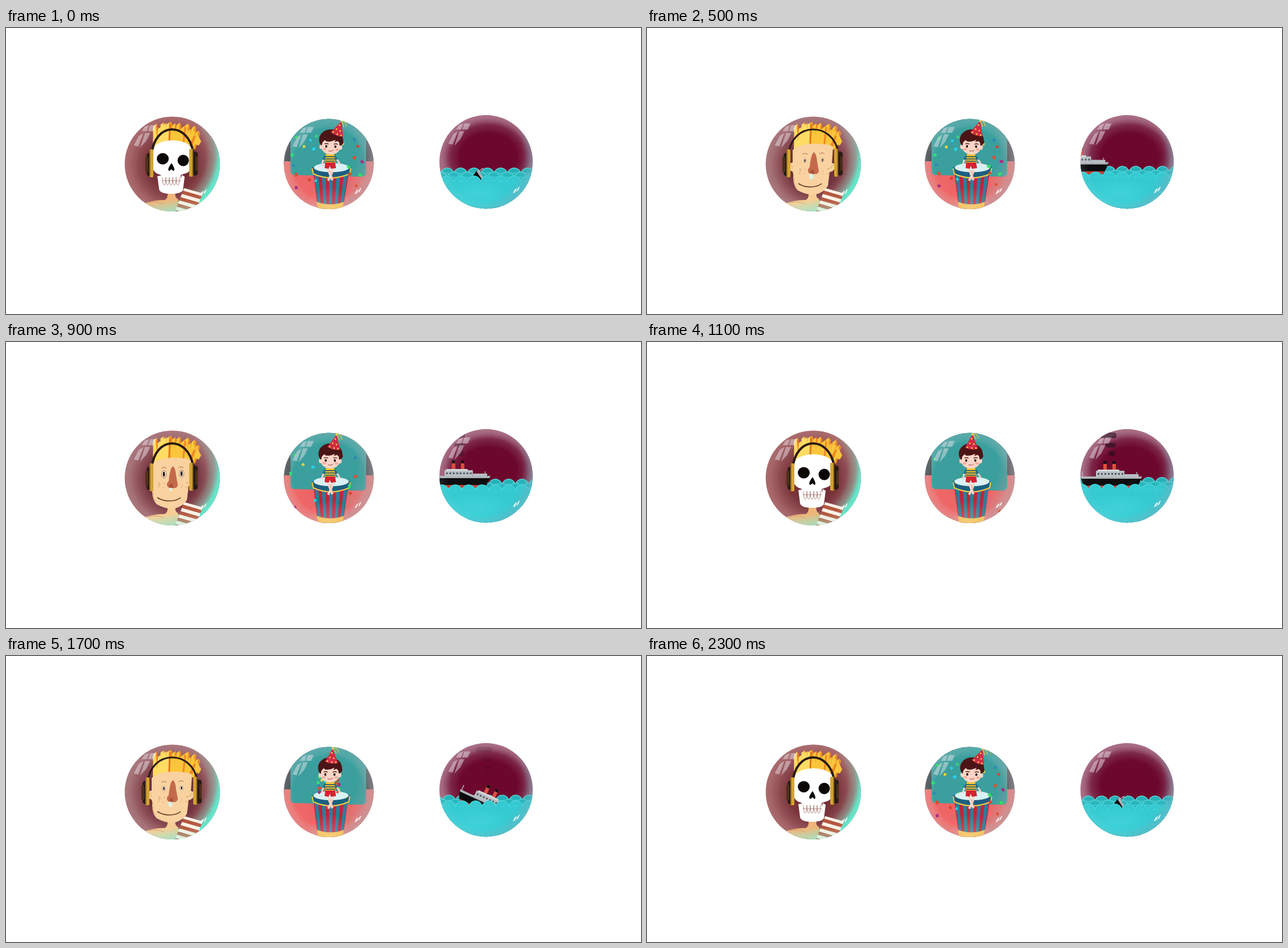
These frames come from a looping animation (1116 px wide and 502 px high, 2.4 s). An HTML page with a canvas:

```html
<!DOCTYPE html>
<html lang="en">
<head>
<meta charset="utf-8">
<title>Three bubbles</title>
<style>
html, body { margin: 0; width: 100%; height: 100%; overflow: hidden; background: #fff; }
canvas { display: block; }
</style>
</head>
<body>
<canvas id="stage" width="1116" height="502"></canvas>
<script>
const ctx = document.getElementById('stage').getContext('2d');
const TAU = Math.PI * 2;
const rad = deg => deg * Math.PI / 180;
const noise = n => { const v = Math.sin(n * 91.7) * 4373.3; return v - Math.floor(v); };

// Linear interpolation through [time, value] stops.
function track(t, ...stops) {
  if (t <= stops[0][0]) return stops[0][1];
  for (let i = 1; i < stops.length; i++) {
    const [t0, a] = stops[i - 1], [t1, b] = stops[i];
    if (t <= t1) return a + (b - a) * (t - t0) / (t1 - t0);
  }
  return stops.at(-1)[1];
}

function fill(color, d) { ctx.fillStyle = color; ctx.fill(new Path2D(d)); }
function line(color, width, d) {
  ctx.strokeStyle = color;
  ctx.lineWidth = width;
  ctx.stroke(new Path2D(d));
}
function oval(color, x, y, rx, ry = rx) {
  ctx.fillStyle = color;
  ctx.beginPath();
  ctx.ellipse(x, y, rx, ry, 0, 0, TAU);
  ctx.fill();
}
function box(color, x, y, w, h) { ctx.fillStyle = color; ctx.fillRect(x, y, w, h); }
function pill(color, x, y, w, h, r) {
  ctx.fillStyle = color;
  ctx.beginPath();
  ctx.roundRect(x, y, w, h, r);
  ctx.fill();
}
function placed(x, y, turn, draw) {
  ctx.save();
  ctx.translate(x, y);
  ctx.rotate(turn);
  draw();
  ctx.restore();
}
// Elliptical wash over a bubble; stops are [offset, color].
function wash(x, y, rx, ry, ...stops) {
  ctx.save();
  ctx.translate(x, y);
  ctx.scale(rx / 100, ry / 100);
  const g = ctx.createRadialGradient(0, 0, 0, 0, 0, 100);
  stops.forEach(([at, color]) => g.addColorStop(at, color));
  box(g, -500, -500, 1000, 1000);
  ctx.restore();
}

function bubble(x, y, rx, ry, scene) {
  ctx.save();
  ctx.beginPath();
  ctx.ellipse(x, y, rx, ry, 0, 0, TAU);
  ctx.clip();
  scene();
  ctx.translate(x, y);
  ctx.scale(rx / 84, ry / 84);
  const pane = 'rgba(235,225,232,.48)';
  fill(pane, 'M-54-58L-49-66L-41-69L-45-58ZM-43-58L-39-69L-28-69L-33-58Z');
  fill(pane, 'M-68-33L-59-50L-51-55L-60-31ZM-57-29L-48-55L-39-55L-46-41Z');
  fill('rgba(255,255,255,.85)', 'M48 56L52 49L56 47L52 55ZM54 54L58 46L61 44L58 51Z');
  ctx.restore();
}

/* ---- listener ---- */

function hair() {
  for (let i = 0; i < 20; i++) {
    const u = (i * 7 % 20) / 19;
    const x = 262 + u * 66, top = 166 + noise(i) * 11 + 20 * (u - .45) ** 2;
    const tip = x + (u - .15) * 9 + noise(i + 40) * 6 - 3;
    fill(i % 3 ? '#fbc63b' : '#ffdc63', `M${x - 4} 213L${tip - 4} ${top + 2}L${tip + 2} ${top - 2}L${x + 4} 213Z`);
    fill(i % 2 ? '#ee8a22' : '#e07a1c', `M${x + 2} 213L${tip + 1} ${top - 2}L${tip + 4} ${top + 2}L${x + 5} 213Z`);
  }
  fill('#fbc63b', 'M322 208L337 187L343 199L339 206L330 204L325 212Z');
  fill('#ee8a22', 'M320 210L330 189L334 189L326 211Z');
}

function skull() {
  fill('#fff', 'M257 218Q258 199 292 197Q321 198 327 213L327 240Q326 253 313 256L307 258L307 270L274 270L272 258Q257 254 257 240Z');
  fill('#fff', 'M266 260L272 259L275 268L306 268L309 258L314 261L311 284Q309 291 290 291Q271 291 269 283Z');
  oval('#0b0705', 275.5, 229.5, 10.5, 10);
  oval('#0b0705', 311.5, 232.5, 10, 10);
  fill('#0b0705', 'M291 237Q282 249 287 251L291 248L294 251Q299 250 291 237Z');
  let teeth = 'M274 268L307 268M275 262';
  for (let x = 275; x < 303; x += 6) teeth += `Q${x} 275 ${x + 3} 276Q${x + 6} 274 ${x + 6} 262`;
  line('#a06b63', .8, teeth);
}

function face(t) {
  const drip = track(t, [100, 0], [300, 1], [400, 1], [700, 0], [1500, 0], [1900, 1], [2200, .6]);
  const eye = 1 - drip * .62;
  fill('#f9d2a0', 'M256 214Q270 203 292 203Q318 203 327 208L325 237Q331 237 330 244Q329 252 321 253L318 277Q312 288 297 292Q281 294 265 285Q257 277 257 263Q258 258 256 252Q249 251 250 243Q251 236 256 236Z');
  line('#d99d6d', 1, 'M252 241Q256 241 255 247M323 247Q325 240 328 241M259 264Q256 273 263 279');
  line('#a8653e', 1, 'M273 222Q278 218 282 222M303 221Q308 217 312 221');
  for (const [x, y] of [[277.5, 232], [308.5, 231]]) {
    oval('#8a5337', x, y + drip, 4.4 * eye, 6.7 * eye);
    oval('#fff0e0', x, y + drip, 3.8 * eye, 6.1 * eye);
    oval('#20110c', x, y + drip, 1.9 * eye, 4.2 * eye);
  }
  for (let i = 0; i < 16; i++) {
    const side = i % 2 ? 308 : 266;
    oval('#d38d58', side + noise(i + 3) * 13, 246 + noise(i + 11) * 11, .8);
  }
  fill('#c5694b', 'M293 218Q298 220 299 235L302 251Q300 258 294 256Q289 258 284 254Q281 249 286 244Q288 222 293 218Z');
  fill('#a94f39', 'M288 250Q293 246 294 256Q290 258 286 255Z');
  oval('#d9f3e8', 289.5 - drip, 259 + drip * 2.5, 2.5 + drip * 2, 3.3 + drip * 3);
  line('#653020', 1.6, 'M266 273Q275 279 287 279Q300 279 307 273');
  if (t >= 600 && t <= 800)
    for (let i = 0; i < 10; i++)
      oval('#fff8e9', (i % 2 ? 320 : 265) + noise(i) * 4, 218 + i * 3.6, 1.3, 1.8);
}

function headphones(open) {
  const left = 256 - open * 14, right = 329 + open * 14;
  line('#2a1a13', 4 - open * 1.8, `M${left} 222C${left + 5} 164 ${right - 9} 164 ${right} 218`);
  pill('#2a1c14', left - 9, 219, 10, 41, 5);
  pill('#4c3019', left - 11, 226, 5, 27, 3);
  pill('#d5a431', left - 4, 213, 7, 49, 2);
  pill('#9b7222', left - 4, 213, 2, 49, 1);
  pill('#2a1c14', right - 1, 217, 9, 42, 5);
  pill('#4c3019', right + 4, 225, 4, 26, 3);
  pill('#d5a431', right - 7, 212, 7, 49, 2);
  pill('#9b7222', right - 2, 212, 2, 49, 1);
}

function listener(t) {
  const bones = t % 1200 >= 1000;
  box(bones ? '#a05d60' : '#9f6a70', 200, 150, 190, 180);
  wash(292, 240, 74, 76, [0, '#672031'], [.6, bones ? '#7a363b' : '#733440'], [.8, 'rgba(128,62,70,.6)'], [1, 'rgba(150,85,92,0)']);
  fill(bones ? '#efb578' : '#f7cd94', 'M236 310Q262 301 279 302Q285 299 284 288L298 286Q296 298 302 300L310 326L232 326Z');
  line('#d79b67', 1, 'M250 307Q266 303 278 309');
  wash(266, 222, 112, 112, [0, 'rgba(120,230,205,0)'], [.76, 'rgba(120,225,200,0)'], [.89, 'rgba(120,205,180,.4)'], [.97, 'rgba(85,232,200,.92)'], [1, '#54e6c8']);
  placed(313, 281, rad(16), () => {
    ctx.beginPath();
    ctx.moveTo(0, 0); ctx.lineTo(34, 0); ctx.lineTo(30, 44); ctx.lineTo(-4, 44);
    ctx.clip();
    for (let i = 0; i < 8; i++) box(i % 2 ? '#b6583e' : '#fff1e6', -8, i * 6 - 1, 50, 6);
  });
  wash(296, 334, 70, 34, [0, 'rgba(150,245,215,.7)'], [1, 'rgba(150,245,215,0)']);
  hair();
  bones ? skull() : face(t);
  headphones(track(t % 1200, [200, 0], [300, 1], [400, 1], [600, 0]));
  wash(292, 239, 85, 85, [0, 'rgba(255,235,235,0)'], [.8, 'rgba(255,235,235,0)'], [1, 'rgba(255,235,235,.12)']);
}

/* ---- party boy ---- */

const confettiSpots = [
  [510, 192], [503, 223], [524, 208], [541, 212], [505, 241], [510, 257], [533, 266],
  [544, 268], [612, 196], [612, 228], [618, 208], [626, 235], [623, 258], [616, 277],
  [604, 256], [510, 280], [602, 244], [545, 190], [592, 203], [535, 197]
];
const confettiColors = ['#e34c2d', '#35df62', '#28d1ed', '#d5462e', '#32de7c', '#2b86b8', '#a82f82', '#f2d23a'];

function confetti(t) {
  const phase = t % 1600;
  if (phase < 100 || phase > 1100) return;
  const spread = track(phase, [100, .3], [200, .62], [300, .84], [500, .95], [700, 1], [1100, 1.08]);
  const drop = track(phase, [700, 0], [1100, 16]);
  const count = track(phase, [700, 20], [900, 11], [1100, 2]);
  for (let i = 0; i < count; i++) {
    const [x, y] = confettiSpots[(i * 7 + 13) % 20];
    placed(568 + (x - 568) * spread, 222 + (y - 222) * spread + drop, i * 1.9 + phase / 260, () => {
      const w = 3 + noise(i) * 3;
      fill(confettiColors[i % 8], `M${-w / 2}-2L${w / 2}-3L${w / 2 + 1} 2L${-w / 2} 2.5Z`);
    });
  }
}

function drum(lean) {
  ctx.save();
  ctx.beginPath();
  ctx.moveTo(540, 252); ctx.lineTo(601 + lean, 252);
  ctx.lineTo(592, 318); ctx.lineTo(548, 318);
  ctx.clip();
  box('#c52235', 530, 245, 82, 75);
  for (let i = 0; i < 5; i++) {
    const a = 541 + i * 13.4, b = 549 + i * 9.4;
    fill('#2b7d9b', `M${a} 248L${a + 7} 248L${b + 5} 318L${b} 318Z`);
  }
  ctx.restore();
  fill('#f2c255', 'M546 305Q570 314 594 305L592 316Q570 325 548 316Z');
  fill('#1d5f80', `M537 245Q571 232 ${605 + lean} 245L${602 + lean} 257Q571 269 539 257Z`);
  line('#f5cf42', 2, `M538 246L540 256Q571 270 ${602 + lean} 256L${604 + lean} 246`);
  oval('#d9f1f4', 571 + lean / 2, 245, 31, 8);
}

function hat(tilt) {
  placed(570 + tilt * 11, 187, rad(2 + tilt * 16), () => {
    line('#e9c63b', 1.3, 'M0-24Q8-29 12-18M0-24Q5-23 8-16');
    fill('#d22b45', 'M-11-1L1-25L12 0Q0 4-11-1Z');
    for (const [x, y] of [[0, -17], [-3, -9], [4, -8], [-7, -2], [1, -1], [8, -1]]) oval('#ffd64c', x, y, 1.4);
    oval('#ffd64c', 1, -25, 1.8);
  });
}

function boy(tilt) {
  const skin = '#fbd5c7';
  line(skin, 4, 'M565 243Q568 255 574 267M575 243Q574 255 566 268');
  line('#d69a8d', .7, 'M570 250L575 266');
  fill('#d42331', 'M561 234L578 234L580 246L571 247L569 242L567 247L560 246Z');
  line(skin, 3, 'M560 229Q555 234 556 241M580 229Q585 234 587 240');
  fill('#1f6e8b', 'M562 221L556 230L561 233L566 225ZM577 221L583 230L578 233L573 225Z');
  fill('#f1c332', 'M562 221L577 221L579 236L560 236Z');
  for (const y of [225, 229, 233]) box('#174f66', 561, y, 17, 1.6);
  placed(569 + tilt * 2, 205, rad(tilt * 2), () => {
    oval(skin, -17, 4, 3, 4);
    oval(skin, 17, 4, 3, 4);
    oval('#4b1517', 0, -9, 21, 18);
    oval(skin, 0, 3, 17, 14);
    fill('#4b1517', 'M-20-12Q-13-27 0-27Q20-24 22-4Q18 2 15 0L15-8L6-5L8-9Q-2-4-9-6L-11-9L-15-4L-16 2Q-22-2-20-12Z');
    line('#5b2017', 1.4, 'M-11-1Q-8-3-4-1M5-1Q9-3 12-1');
    oval('#180d0c', -8, 3, 1.8, 2.3);
    oval('#180d0c', 8, 3, 1.8, 2.3);
    oval('rgba(240,132,120,.55)', -11, 8, 3, 2);
    oval('rgba(240,132,120,.55)', 11, 8, 3, 2);
    line('#a5493d', 1, 'M-4 10Q0 13 5 9');
  });
  hat(tilt);
}

function party(t) {
  const tilt = track(t, [100, .2], [300, .5], [700, 1], [1100, 0], [1400, .35], [1900, 0], [2300, 1]);
  box('#41474b', 480, 150, 180, 90);
  box('#ed716f', 480, 234, 180, 90);
  wash(560, 260, 66, 66, [0, 'rgba(242,58,66,.3)'], [.7, 'rgba(242,58,66,.18)'], [1, 'rgba(242,58,66,0)']);
  fill('#3a9f9d', 'M480 150L655 150L633 195L633 255Q632 261 624 261L506 258Q500 257 500 251L500 195Z');
  wash(567, 239, 80, 80, [0, 'rgba(255,255,255,0)'], [.78, 'rgba(255,255,255,0)'], [.88, 'rgba(210,220,224,.14)'], [1, 'rgba(195,205,212,.25)']);
  wash(530, 216, 126, 126, [0, 'rgba(175,160,165,0)'], [.68, 'rgba(175,160,165,0)'], [1, 'rgba(175,160,165,.55)']);
  drum(tilt * 2);
  confetti(t);
  boy(tilt);
  wash(567, 320, 42, 42, [0, 'rgba(255,225,210,.32)'], [1, 'rgba(255,225,210,0)']);
}

/* ---- ship ---- */

function scallops(y, shift, color, rim) {
  for (let x = 726.5 + shift; x < 945; x += 23.5) {
    oval(rim, x, y + 13, 12.6, 13);
    oval(color, x, y + 14, 11.4, 12.6);
    oval(rim, x, y + 18, 8, 9);
    oval(color, x, y + 18.8, 7, 8.5);
  }
  box(color, 750, y + 11, 190, 90);
}

function ship() {
  fill('#c63f30', 'M5 13L101 13L99 20L9 20Z');
  fill('#0c0c0f', 'M0 1L108 1L101 15L5 15Z');
  fill('#aeb3b7', 'M0-1L108-1L106 3L1 3Z');
  box('#aeb3b7', 2, -10, 1.5, 10);
  box('#aeb3b7', 98, -9, 1.3, 9);
  for (const x of [40, 56]) {
    box('#dd503b', x, -27, 6, 18);
    box('#1a1215', x, -28, 6, 5);
  }
  box('#b9bfc4', 27, -11, 50, 11);
  box('#d5d9db', 30, -13, 38, 3);
  box('#b9bfc4', 77, -5, 25, 5);
  for (let x = 30; x < 74; x += 6) box('#4f555d', x, -7, 3, 3);
}

function smoke(t) {
  if (t < 800 || t > 1800) return;
  const x = track(t, [800, 790], [1100, 817], [1400, 835], [1800, 850]);
  const shade = `rgba(36,12,30,${track(t, [800, .2], [1100, .6], [1400, .5], [1800, 0])})`;
  oval(shade, x, 196, 6.5, 4.5);
  pill(shade, x - 11, 177, 18, 8, 4);
  pill(shade, x - 20, 159, 28, 10, 4);
}

function sea(t) {
  box('#a2647c', 755, 145, 180, 180);
  wash(848, 226, 84, 70, [0, '#6c062b'], [.6, '#6d082d'], [.8, 'rgba(112,20,55,.75)'], [1, 'rgba(140,65,95,0)']);
  smoke(t);
  const back = track(t, [100, 244], [300, 241], [700, 243], [1100, 237], [1400, 244], [1900, 243], [2300, 245]);
  const front = track(t, [100, 258], [300, 253], [700, 251], [1100, 249], [1400, 250], [1900, 256], [2300, 259]);
  const drift = track(t, [100, 4], [300, 12], [700, 18], [1100, 14], [1400, 6], [1900, 4], [2300, 2]);
  scallops(back, drift, '#25b2b8', '#5bd2d6');
  scallops(back + 7, drift + 11.75, '#28b8be', '#5bd2d6');
  const x = track(t, [100, 660], [300, 682], [700, 725], [1100, 762], [1400, 777], [1900, 812], [2300, 829]);
  const y = track(t, [300, 238], [700, 235], [1100, 237], [1400, 231], [1900, 237], [2300, 249]);
  const turn = track(t, [1100, 0], [1400, 9.5], [1900, 35], [2300, 57]);
  placed(x, y, rad(turn), ship);
  scallops(front, drift, '#35cad1', '#45d2d8');
  wash(828, 292, 62, 26, [0, 'rgba(80,222,230,.4)'], [1, 'rgba(80,222,230,0)']);
  wash(822, 222, 110, 110, [0, 'rgba(105,173,187,0)'], [.78, 'rgba(105,173,187,0)'], [.92, 'rgba(91,164,181,.36)'], [1, 'rgba(93,178,190,.6)']);
  wash(843, 235, 84, 84, [0, 'rgba(255,255,255,0)'], [.8, 'rgba(255,255,255,0)'], [1, 'rgba(240,225,235,.1)']);
}

function draw(now) {
  // Poses change every 100 ms; the first repeats the last.
  const t = Math.floor(now / 100) % 24 * 100 || 2300;
  box('#fff', 0, 0, 1116, 502);
  bubble(292.3, 238.8, 83.7, 83.3, () => listener(t));
  bubble(567.3, 238.7, 79, 79.2, () => party(t));
  bubble(843.7, 235, 82, 82.2, () => sea(t));
}

const start = performance.now();
function tick() {
  draw(performance.now() - start);
  requestAnimationFrame(tick);
}
tick();
</script>
</body>
</html>
```
